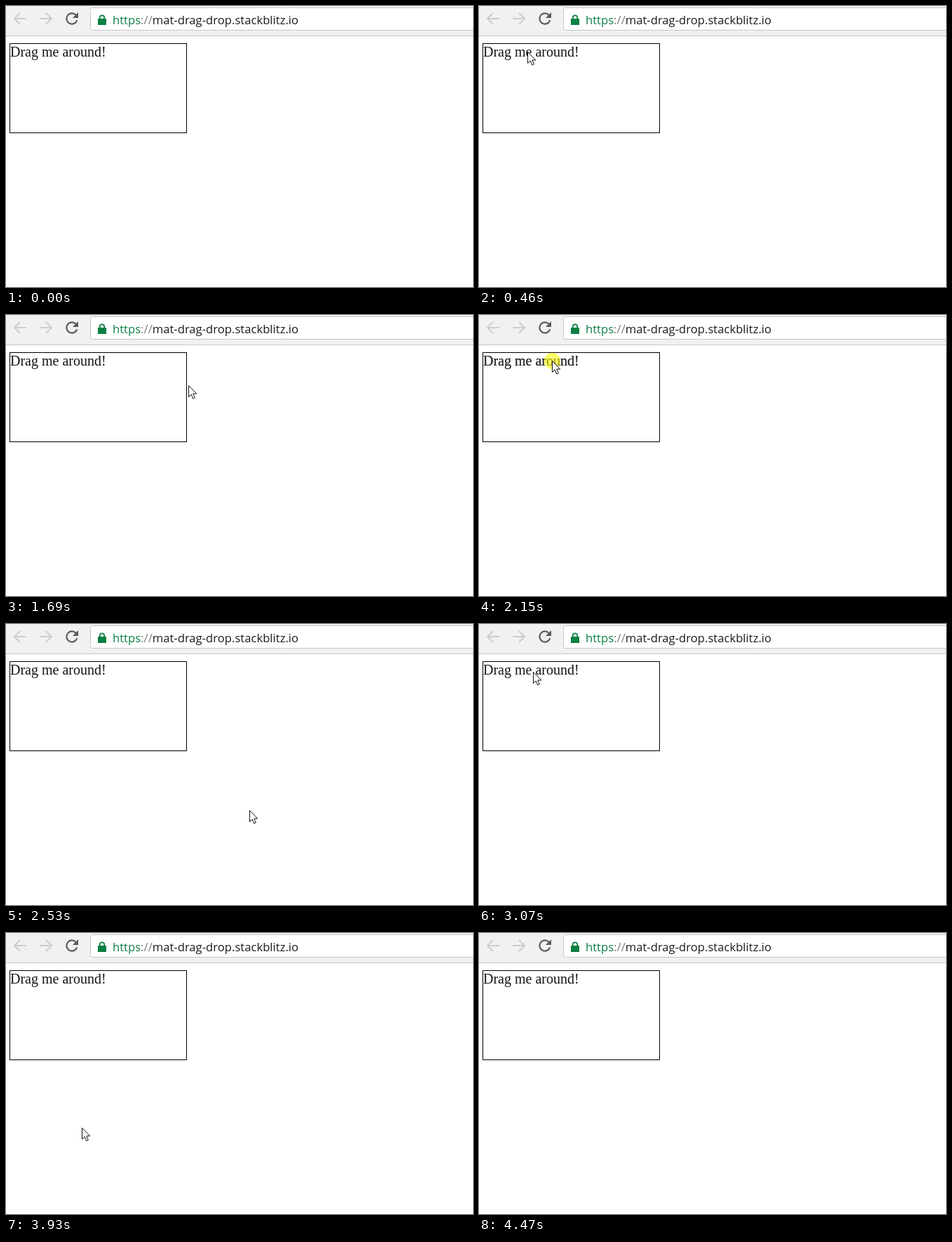
These frames come from a looping animation (666x400 px, 5000 ms). An HTML page with a canvas:

```html
<!DOCTYPE html>
<html lang="en">
<head>
<meta charset="utf-8">
<title>Drag me around</title>
<style>
html, body { margin: 0; width: 100%; height: 100%; overflow: hidden; background: #fff; }
canvas { display: block; }
</style>
</head>
<body>
<canvas id="stage" width="666" height="400"></canvas>
<script>
const ctx = document.getElementById('stage').getContext('2d');
const LOOP = 5000, TICK = 77;

// Each move: start time, end points, progress per tick, vertical bow.
// A drag also has the label's final offset and its own progress.
const moves = [
  { at: 70, from: [461, 346], to: [69, 65], f: [0, 0.3, 0.6, 0.84, 0.96, 1] },
  { at: 840, from: [69, 65], to: [387, 131], f: [0, 0.31, 0.71, 0.97, 1], bow: 1,
    drag: [316, 69], g: [0, 0.28, 0.683, 0.95, 1], drop: 1460 },
  { at: 1610, from: [387, 131], to: [104, 65], f: [0.17, 0.449, 0.7, 0.88, 0.97, 1], bow: -1.4 },
  { at: 2150, from: [104, 65], to: [347, 265], f: [0, 0.535, 0.88, 1], bow: -18,
    drag: [243, 200], g: [0, 0.35, 0.868, 1], drop: 2530 },
  { at: 2610, from: [347, 265], to: [74, 66], f: [0.077, 0.25, 0.5, 0.72, 0.87, 0.95, 0.99, 1] },
  { at: 3230, from: [74, 66], to: [108, 277], f: [0, 0.18, 0.676, 0.93, 1], bow: 28,
    drag: [33, 211], g: [0, 0.18, 0.676, 0.93, 1], drop: 3930 },
  { at: 3930, from: [108, 277], to: [531, 398], f: [0, 0.1, 0.3, 0.55, 0.8, 0.95, 1] }
];
const EXIT = 4470;

function along([x0, y0], [x1, y1], f, bow = 0) {
  return [
    Math.round(x0 + (x1 - x0) * f),
    Math.round(y0 + (y1 - y0) * f + 4 * bow * f * (1 - f))
  ];
}

function path(points, close) {
  ctx.beginPath();
  points.forEach(([x, y]) => ctx.lineTo(x, y));
  if (close) ctx.closePath();
}

function text(str, x, y, font, color) {
  ctx.font = font;
  ctx.fillStyle = color;
  ctx.fillText(str, x, y);
}

function label(dx, dy, color) {
  text('Drag me around!', 6 + dx, 72 + dy, '20px "Liberation Serif", Times, serif', color);
}

function navArrow(tail, head) {
  const back = head + Math.sign(tail - head) * 8;
  ctx.strokeStyle = '#cdcdcd';
  ctx.lineWidth = 2;
  path([[tail, 18], [head, 18]]);
  ctx.stroke();
  path([[back, 10], [head, 18], [back, 26]]);
  ctx.stroke();
}

function reload() {
  ctx.strokeStyle = ctx.fillStyle = '#5a5a5a';
  ctx.lineWidth = 2.2;
  ctx.beginPath();
  ctx.arc(94, 18, 7.6, 0.3, Math.PI * 1.76);
  ctx.stroke();
  path([[103, 9], [103, 17], [95, 17]], true);
  ctx.fill();
}

function lock() {
  ctx.fillStyle = ctx.strokeStyle = '#0b8043';
  ctx.fillRect(131, 18, 12, 9);
  ctx.lineWidth = 1.8;
  ctx.beginPath();
  ctx.moveTo(133.8, 19);
  ctx.lineTo(133.8, 16.5);
  ctx.arc(137, 16.5, 3.2, Math.PI, 0);
  ctx.lineTo(140.2, 19);
  ctx.stroke();
}

function toolbar() {
  ctx.fillStyle = '#f1f1f1';
  ctx.fillRect(0, 0, 666, 42);
  ctx.fillStyle = '#c8c8c8';
  ctx.fillRect(0, 42, 666, 1);

  ctx.beginPath();
  ctx.roundRect(120.5, 2.5, 560, 32, 3);
  ctx.fillStyle = '#fff';
  ctx.fill();
  ctx.strokeStyle = '#c6c6c6';
  ctx.lineWidth = 1;
  ctx.stroke();

  navArrow(29, 12);
  navArrow(48, 65);
  reload();
  lock();

  const font = '16.65px "Open Sans", "Noto Sans", sans-serif';
  let x = 152;
  for (const [part, color] of [
    ['https', '#0b8043'], ['://', '#808080'], ['mat-drag-drop.stackblitz.io', '#1c1c1c']
  ]) {
    text(part, x, 26, font, color);
    x += ctx.measureText(part).width;
  }
}

function halo([x, y]) {
  ctx.fillStyle = 'rgba(255, 255, 0, 0.58)';
  ctx.beginPath();
  ctx.arc(x + 0.5, y + 0.5, 11.7, 0, Math.PI * 2);
  ctx.fill();
}

function cursor([x, y]) {
  ctx.save();
  ctx.translate(x + 0.5, y + 0.5);
  path([[0, 0], [0, 16], [3.7, 12.5], [6.2, 18.4], [8.8, 17.3], [6.3, 11.5], [11.3, 11.5]], true);
  ctx.fillStyle = '#fff';
  ctx.fill();
  ctx.strokeStyle = '#111';
  ctx.lineWidth = 1;
  ctx.stroke();
  ctx.restore();
}

function draw(t) {
  ctx.fillStyle = '#fff';
  ctx.fillRect(0, 0, 666, 400);
  toolbar();
  ctx.strokeStyle = '#000';
  ctx.lineWidth = 1;
  ctx.strokeRect(5.5, 53.5, 252, 127);
  label(0, 0, '#151515');

  const move = moves.findLast(m => t >= m.at);
  if (!move || t >= EXIT) return;
  const step = Math.min(Math.floor((t - move.at + 5) / TICK), move.f.length - 1);
  const tip = along(move.from, move.to, move.f[step], move.bow);
  if (move.drag && t < move.drop) {
    const [dx, dy] = along([0, 0], move.drag, move.g[step], move.bow);
    label(dx, dy, '#2e2e2e');
    halo(tip);
  }
  cursor(tip);
}

const start = performance.now();
function frame() {
  draw((performance.now() - start) % LOOP);
  requestAnimationFrame(frame);
}
frame();
</script>
</body>
</html>
```
